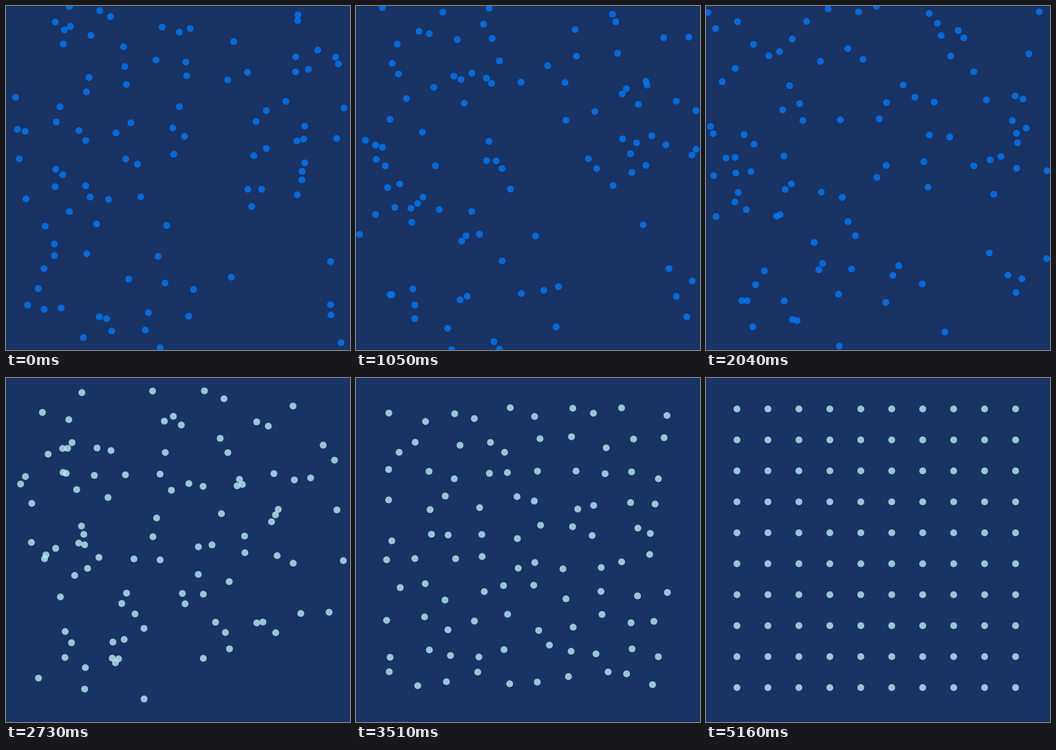
An HTML page with a canvas for the animation above (5400 ms loop, 500 by 500 pixels).

```html
<!DOCTYPE html>
<html lang="en">
<head>
<meta charset="utf-8">
<title>Dots: drift and gather</title>
<style>
  html, body { margin: 0; width: 100%; height: 100%; overflow: hidden; background: #193364; }
  canvas { display: block; width: 100vmin; height: 100vmin; }
</style>
</head>
<body>
<canvas id="stage" width="500" height="500"></canvas>
<script>
const SIZE = 500, GRID = 10, GAP = 45, RADIUS = 5;
const CELL = SIZE / GRID, COUNT = GRID * GRID;
const LOOP = 5400, STEP = 30, GATHER = 2670;
const DECAY = 0.9;   // share of the distance left after each step
const SPEED = 2;     // largest drift per step on each axis
const BLUE = 'rgba(0, 120, 248, 0.8)', PALE = 'rgba(184, 235, 242, 0.8)';

const ctx = document.getElementById('stage').getContext('2d');

function seeded(seed) {
  return () => {
    seed = (seed + 0x6D2B79F5) | 0;
    let n = Math.imul(seed ^ (seed >>> 15), 1 | seed);
    n = (n + Math.imul(n ^ (n >>> 7), 61 | n)) ^ n;
    return ((n ^ (n >>> 14)) >>> 0) / 4294967296;
  };
}

const random = seeded(27);
const spread = max => (random() * 2 - 1) * max;

// Reflects a straight path between the stage edges.
function bounce(p) {
  const a = Math.abs(p);
  return a > SIZE ? 2 * SIZE - a : a;
}

// A loose spot around a cell; the lower right is filled more thinly.
function scatter(cell) {
  for (;;) {
    const x = bounce((cell % GRID + 0.5) * CELL + spread(1.2 * CELL));
    const y = bounce((Math.floor(cell / GRID) + 0.5) * CELL + spread(1.2 * CELL));
    const sparse = x > 230 && y > 270;
    if (!sparse || random() < 0.45) return { x, y };
    cell = Math.floor(random() * COUNT);
  }
}

const cells = Array.from({ length: COUNT }, (_, cell) => ({ cell, key: random() }))
  .sort((a, b) => a.key - b.key);

const dots = cells.map(({ cell }, i) => ({
  ...scatter(cell),
  vx: spread(SPEED),
  vy: spread(SPEED),
  homeX: GAP * (1 + i % GRID),
  homeY: GAP * (1 + Math.floor(i / GRID))
}));

function draw(time) {
  const t = Math.floor((time % LOOP) / STEP) * STEP;
  const gathering = t > GATHER;
  const steps = Math.min(t, GATHER) / STEP;
  const left = gathering ? DECAY ** ((t - GATHER) / STEP) : 1;

  ctx.clearRect(0, 0, SIZE, SIZE);
  ctx.fillStyle = gathering ? PALE : BLUE;
  for (const d of dots) {
    const x = bounce(d.x + d.vx * steps);
    const y = bounce(d.y + d.vy * steps);
    ctx.beginPath();
    ctx.arc(d.homeX + (x - d.homeX) * left, d.homeY + (y - d.homeY) * left, RADIUS, 0, Math.PI * 2);
    ctx.fill();
  }
}

const start = performance.now();
function tick() {
  draw(performance.now() - start);
  requestAnimationFrame(tick);
}
tick();
</script>
</body>
</html>
```
